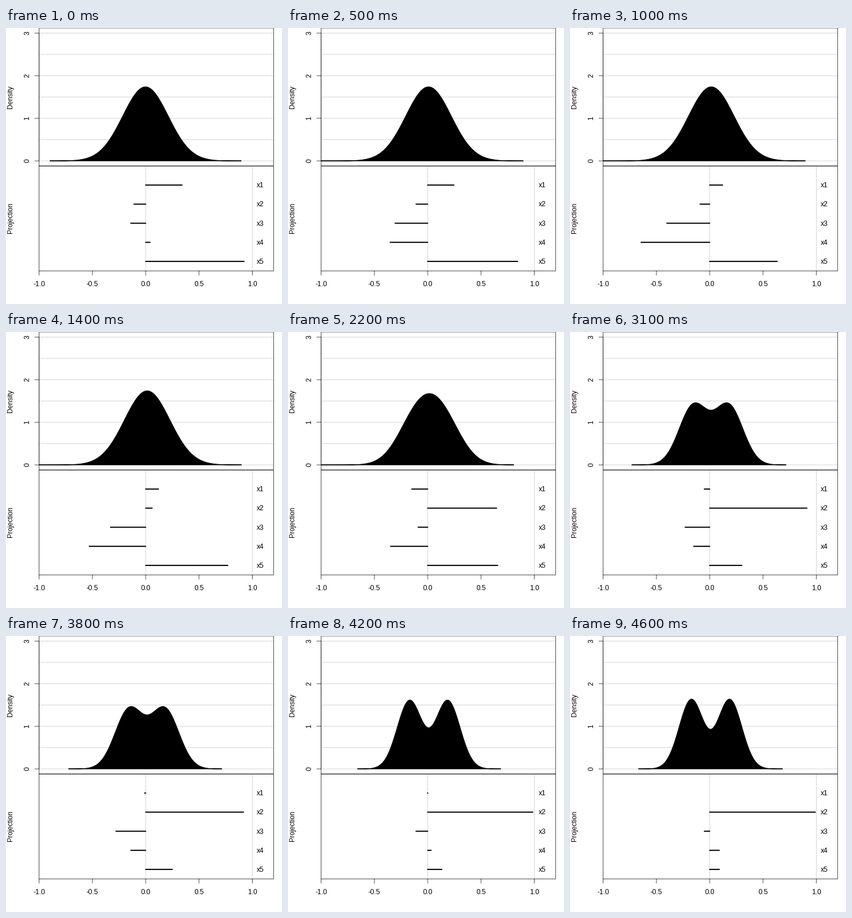
These frames come from a looping animation (480 px wide and 480 px high, 4.7 s). A matplotlib script:

```python
import numpy as np
import matplotlib.pyplot as plt
from matplotlib.animation import FuncAnimation

FRAMES, INTERVAL = 47, 100
PX = 0.72  # points per pixel at 100 dpi
LEFT, RIGHT, MID, BOTTOM = 57.5, 465.5, 240.0, 422.5
UNIT_X, UNIT_Y = 408 / 2.2, 240 / 3.24
ROW = (BOTTOM - MID) / 5.5
GRID = "#d3d3d3"
INK = (0, 0, 0, 0.7)
TOP_SPEED = 0.092  # radians per frame

plt.rcParams["font.family"] = "Liberation Sans"
plt.rcParams["font.size"] = 12 * PX

# Projections the tour visits: time -> direction
STOPS = {
    0: (0.34, -0.11, -0.14, 0.04, 0.92),
    10: (0.12, -0.09, -0.40, -0.64, 0.63),
    14: (0.12, 0.06, -0.33, -0.53, 0.77),
    22: (-0.15, 0.65, -0.09, -0.35, 0.66),
    31: (-0.05, 0.91, -0.23, -0.15, 0.30),
    38: (-0.01, 0.92, -0.28, -0.14, 0.25),
    46: (0.00, 0.99, -0.05, 0.09, 0.09),
}
TIMES = list(STOPS)
DIRS = [np.array(v) / np.linalg.norm(v) for v in STOPS.values()]


def px(x):
    return LEFT + (np.asarray(x) + 1) * UNIT_X


def py(y):
    return MID - (np.asarray(y) + 0.12) * UNIT_Y


def pose(t):
    """Follow the geodesic to the next stop, slowing when there is time left."""
    i = min(np.searchsorted(TIMES, t, side="right") - 1, len(TIMES) - 2)
    a, b = DIRS[i], DIRS[i + 1]
    span = TIMES[i + 1] - TIMES[i]
    angle = np.arccos(np.clip(a @ b, -1, 1))
    power = np.clip(TOP_SPEED * span / angle, 1, 2)
    u = 1 - (1 - (t - TIMES[i]) / span) ** power
    return (np.sin((1 - u) * angle) * a + np.sin(u * angle) * b) / np.sin(angle)


def density(a):
    """Two normal lobes of constant total variance; x2 drives them apart."""
    x2, x4 = a[1], a[3]
    lo = -0.9 + 0.25 * x2 ** 2 - 1.8 * x4 ** 2
    hi = 0.9 - 0.22 * x2 ** 2
    x = np.linspace(max(lo, -1), hi, 400)
    d = x - 0.01 * x2 + 0.025 * x4
    m = 0.182 * x2
    var = 0.0455 - m ** 2
    lobes = sum(np.exp(-(d - c) ** 2 / (2 * var)) for c in (-m, m))
    return x, 0.465 * lobes / np.sqrt(2 * np.pi * var)


fig = plt.figure(figsize=(4.8, 4.8), dpi=100, facecolor="white")
ax = fig.add_axes([0, 0, 1, 1])
ax.set(xlim=(0, 480), ylim=(480, 0))
ax.axis("off")


def line(xs, ys, color=INK, width=1, **kw):
    return ax.plot(xs, ys, color=color, lw=width * PX, snap=False, **kw)[0]


def vtext(x, y, s):
    ax.text(x, y, s, rotation=90, rotation_mode="anchor",
            ha="center", va="baseline")


def box(top, bottom):
    line([LEFT, RIGHT, RIGHT, LEFT, LEFT], [top, top, bottom, bottom, top],
         zorder=4)


for level in np.arange(0, 3.1, 0.5):
    line([LEFT, RIGHT], [py(level)] * 2, GRID, zorder=1)
for v in (0, 1):
    line([px(v)] * 2, [MID, BOTTOM], GRID, zorder=1)

box(0, MID)
box(MID, BOTTOM)

line([LEFT] * 2, py([0, 3]), zorder=5)
for v in range(4):
    line([LEFT - 7.2, LEFT], [py(v)] * 2, zorder=5)
    vtext(40.6, py(v) - 0.4, str(v))

for v in np.arange(-1, 1.1, 0.5):
    line([px(v)] * 2, [BOTTOM, BOTTOM + 7.2], zorder=5)
    ax.text(px(v), 449.2, f"{v:.1f}", ha="center", va="baseline")

vtext(11.4, MID / 2 - 0.5, "Density")
vtext(11.4, (MID + BOTTOM) / 2 - 0.5, "Projection")

rows = [MID + ROW * (i + 1) for i in range(5)]
bars = []
for i, y in enumerate(rows):
    ax.text(435.4, y + 4, f"x{i + 1}", ha="left", va="baseline")
    bars.append(line([], [], "black", 2, solid_capstyle="round", zorder=3))

hump = plt.Polygon([[0, 0], [1, 0], [1, 1]], closed=True, facecolor="black",
                   edgecolor="black", lw=PX, snap=False, zorder=2)
ax.add_patch(hump)


def update(t):
    a = pose(t)
    x, y = density(a)
    hump.set_xy(np.column_stack([px(x), py(y)]))
    for bar, v, row in zip(bars, a, rows):
        bar.set_data(px([0, v]), [row, row])
    return [hump, *bars]


anim = FuncAnimation(fig, update, frames=FRAMES, interval=INTERVAL,
                     repeat=True, repeat_delay=0, blit=False)
plt.show()
```
